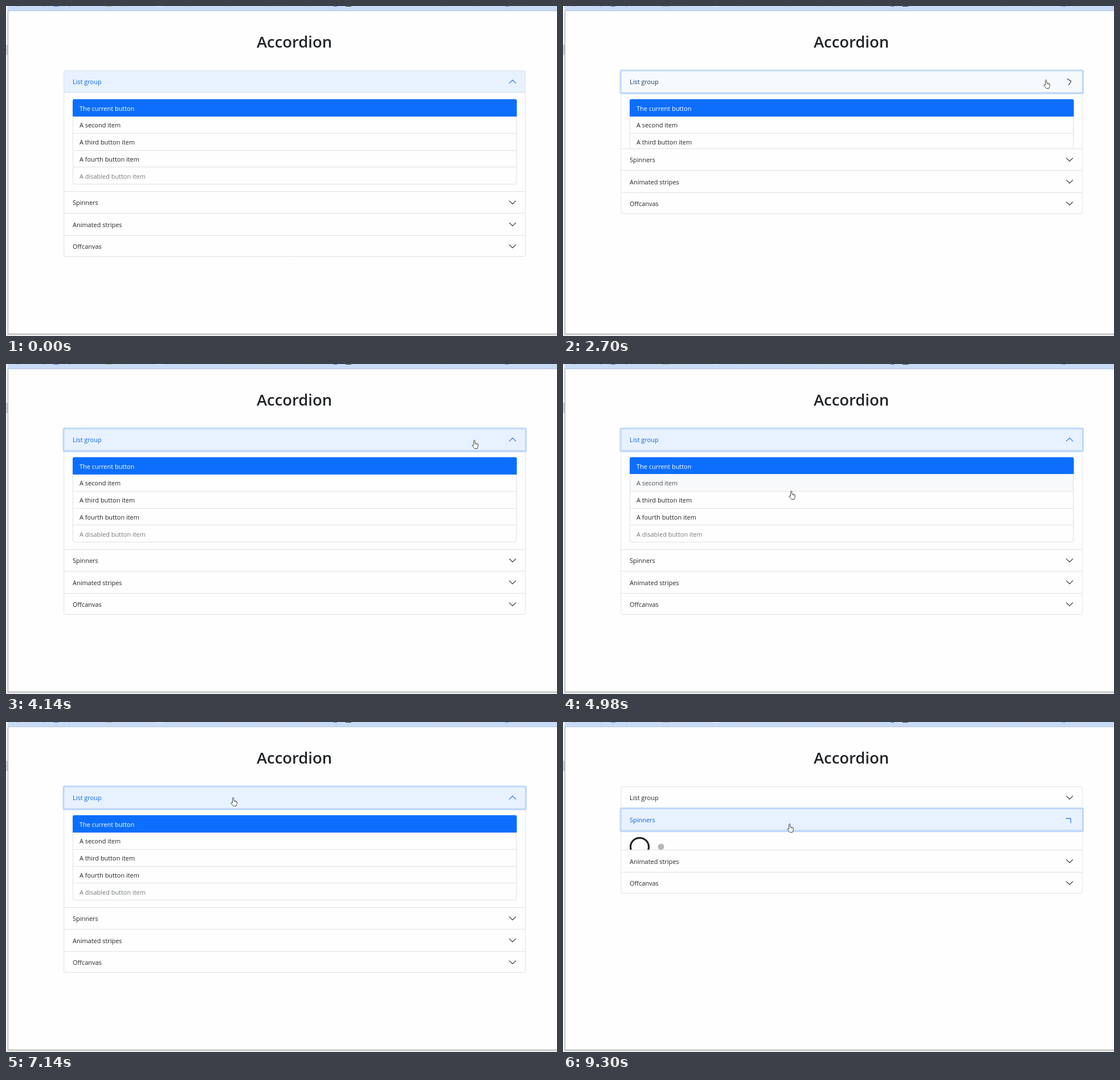
An HTML page with a canvas for the animation above (9.36 s loop, 967 px wide and 579 px high).

```html
<!DOCTYPE html>
<html lang="en">
<head>
<meta charset="utf-8">
<title>Accordion</title>
<style>
html, body { margin: 0; width: 100%; height: 100%; overflow: hidden; background: #fff; }
canvas { display: block; }
</style>
</head>
<body>
<canvas id="stage" width="967" height="579"></canvas>
<script>
const ctx = document.getElementById('stage').getContext('2d');
const LOOP = 9360, STEP = 60;
const LEFT = 101.5, RIGHT = 911.5, TOP = 113, HEAD = 38.5;
const ROW = 29.75, LIST_TOP = 12.5;
const COLLAPSE = 230, TURN = 131, FADE = 100;
const FONT = '"Open Sans", "Noto Sans", sans-serif';
const DARK = [33, 37, 41], BLUE = [12, 99, 228], WHITE = [254, 254, 254], PALE = [231, 241, 255];
const LINE = '#e1e1e1';

const ITEMS = ['The current button', 'A second item', 'A third button item',
  'A fourth button item', 'A disabled button item'];

// Toggles: [time, open]
const PANELS = [
  { title: 'List group', height: 173.5, toggles: [[-1e4, 1], [2640, 0], [3878, 1], [7938, 0]], body: drawList },
  { title: 'Spinners', height: 53, toggles: [[-1e4, 0], [9213, 1]], body: drawSpinners },
  { title: 'Animated stripes', height: 0, toggles: [[-1e4, 0]] },
  { title: 'Offcanvas', height: 0, toggles: [[-1e4, 0]] }
];

// Pointer path: [time, x, y]
const PATH = [
  [540, 952, 44], [750, 945, 54], [900, 925, 70], [1080, 895, 81], [1200, 862, 87],
  [1440, 817, 96], [1500, 814, 100], [1620, 820, 112], [1800, 838, 126], [1920, 843, 129],
  [4080, 843, 129], [4320, 740, 145], [4560, 530, 178], [4800, 403, 205],
  [4980, 396, 222], [5400, 388, 258], [5760, 384, 286], [5820, 383, 289], [5940, 384, 300],
  [6120, 384, 300], [6300, 378, 275], [6540, 380, 236], [6840, 386, 170], [7080, 394, 133],
  [7140, 394, 132], [8340, 394, 132], [8580, 387, 185], [8760, 393, 178]
];

const HAND = new Path2D('M3.5 10V1.7a1.1 1.1 0 0 1 2.2 0V6.1l4.5 1q1.4.4 1.3 1.9L10.8 12.4 9.8 15.5H5L1 10.7q-.6-1.3.8-1.5z');
const KNUCKLES = new Path2D('M7.5 6.8v1.8M9.4 7.2v1.6');
const ARROW = new Path2D('M.5.5V13l2.9-2.7 2 4.8 2-.9-2-4.6h4z');

const clamp = v => Math.max(0, Math.min(1, v));
const lerp = (a, b, k) => a + (b - a) * k;
const mix = (a, b, k) => `rgb(${a.map((v, i) => Math.round(lerp(v, b[i], k)))})`;

function bezier(x1, y1, x2, y2) {
  const at = (a, b, s) => 3 * a * s * (1 - s) ** 2 + 3 * b * s * s * (1 - s) + s ** 3;
  return x => {
    let lo = 0, hi = 1;
    for (let i = 0; i < 24; i++) {
      const mid = (lo + hi) / 2;
      if (at(x1, x2, mid) < x) lo = mid; else hi = mid;
    }
    return at(y1, y2, lo);
  };
}
const ease = bezier(.25, .1, .25, 1);
const easeInOut = bezier(.42, 0, .58, 1);

const lastToggle = (panel, t) => panel.toggles.filter(e => e[0] <= t).pop();
const isOpen = (panel, t) => lastToggle(panel, t)[1];

function amount(panel, t, span, curve) {
  const [start, open] = lastToggle(panel, t);
  const k = curve(clamp((t - start) / span));
  return open ? k : 1 - k;
}

function pointer(t) {
  if (t < PATH[0][0]) return null;
  const i = PATH.findIndex(p => p[0] > t);
  if (i < 0) return PATH[PATH.length - 1].slice(1);
  const a = PATH[i - 1], b = PATH[i], k = (t - a[0]) / (b[0] - a[0]);
  return [lerp(a[1], b[1], k), lerp(a[2], b[2], k)];
}

function fill(color, x, y, w, h) {
  ctx.fillStyle = color;
  ctx.fillRect(x, y, w, h);
}

function roundBox(x, y, w, h, r) {
  ctx.beginPath();
  ctx.roundRect(x, y, w, h, r);
}

function text(str, x, y, color, font = '10.95px ') {
  ctx.font = font + FONT;
  ctx.fillStyle = color;
  ctx.fillText(str, x, y);
}

function drawWindow() {
  fill('#fefefe', 0, 0, 967, 579);
  fill('#f3f3f3', 0, 0, 3, 579);
  fill('#cdcdcd', 0, 68, 3, 18);
  fill('#c8dbf6', 3, 0, 964, 8);
  fill('#b7c6da', 3, 8, 964, 1);
  fill('#e9e9e9', 0, 576, 967, 3);
  fill('#a0a0a0', 3, 9, 1, 567);
  fill('#939393', 3, 575, 964, 1);
  // Lower edges of the bookmark icons
  for (const x of [204, 315, 390, 455, 480, 530, 770, 828, 903]) fill('#d5d5d0', x - 5, 0, 11, 1);
  fill('#e0a890', 18, 0, 4, 1);
  fill('#8fb4ee', 64, 0, 3, 1);
  fill('#3b7cf0', 84, 0, 8, 1);
  fill('#8fb4ee', 110, 0, 3, 1);
  fill('#b9ad9c', 175, 0, 11, 1);
  fill('#eef3ee', 263, 0, 11, 1);
  fill('#2f68e0', 575, 0, 6, 1);
  fill('#30363c', 596, 0, 10, 1);
  fill('#5b8ff0', 876, 0, 6, 1);
}

function drawList(y, t, tip) {
  const x = 117, w = 779.5, top = y + LIST_TOP;
  const hover = tip && tip[0] > x && tip[0] < x + w ? Math.floor((tip[1] - top) / ROW) : -1;
  ITEMS.forEach((label, i) => {
    const rowTop = Math.round(top + i * ROW - .6);
    const lit = i === hover && i > 0 && i < 4;
    if (lit) fill('#f8f9fa', x, rowTop, w, ROW);
    if (i > 1) fill(LINE, x, rowTop, w, 1);
    const color = i === 0 ? '#fff' : i === 4 ? '#757b80' : lit ? '#495057' : '#212529';
    if (i === 0) {
      ctx.fillStyle = '#0d6efd';
      roundBox(x, top - .5, w, ROW + .7, [3, 3, 0, 0]);
      ctx.fill();
    }
    text(label, 129, top + i * ROW + 19.5, color);
  });
  ctx.strokeStyle = LINE;
  ctx.lineWidth = 1;
  ctx.beginPath();
  ctx.moveTo(x + .5, top + ROW + .5);
  ctx.lineTo(x + .5, top + 146);
  ctx.quadraticCurveTo(x + .5, top + 148.5, x + 3, top + 148.5);
  ctx.lineTo(x + w - 4, top + 148.5);
  ctx.quadraticCurveTo(x + w - 1, top + 148.5, x + w - 1, top + 146);
  ctx.lineTo(x + w - 1, top + ROW + .5);
  ctx.stroke();
}

function drawSpinners(y, t) {
  const cy = y + 29.3, since = t - 9213;
  const turn = Math.PI * (.5 + 2 * (since - 87) / 490);
  ctx.strokeStyle = '#212529';
  ctx.lineWidth = 3.2;
  ctx.beginPath();
  ctx.arc(134.5, cy, 16, turn + Math.PI / 4, turn + Math.PI * 1.75);
  ctx.stroke();
  const k = clamp(since / 245);
  ctx.fillStyle = `rgba(33,37,41,${k * .92})`;
  ctx.beginPath();
  ctx.arc(172, cy - .3, 15.5 * k, 0, Math.PI * 2);
  ctx.fill();
}

function chevron(y, turn, color) {
  ctx.save();
  ctx.translate(889, y);
  ctx.rotate(-Math.PI * turn);
  ctx.strokeStyle = color;
  ctx.lineWidth = 1.05;
  ctx.lineCap = ctx.lineJoin = 'round';
  ctx.beginPath();
  ctx.moveTo(-5.6, -2.8);
  ctx.lineTo(0, 2.8);
  ctx.lineTo(5.6, -2.8);
  ctx.stroke();
  ctx.restore();
}

function drawRing(y, alpha) {
  if (alpha <= 0) return;
  ctx.globalAlpha = alpha;
  ctx.strokeStyle = '#bfd8fc';
  ctx.lineWidth = 3;
  roundBox(101, y, 811.5, 40.3, 2);
  ctx.stroke();
  ctx.globalAlpha = 1;
}

function drawAccordion(t, tip) {
  const width = RIGHT - LEFT;
  const tops = [];
  let y = TOP;
  for (const panel of PANELS) {
    tops.push(y);
    const shown = panel.height * amount(panel, t, COLLAPSE, ease);
    const tint = amount(panel, t, FADE, easeInOut);
    if (tint > 0) fill(mix(WHITE, PALE, tint), LEFT, y, width, HEAD);
    if (y > TOP) fill(LINE, LEFT, Math.round(y), width, 1);
    if (shown > .2) {
      fill(mix([223, 223, 223], [205, 217, 233], tint), LEFT, Math.round(y + HEAD) - 1, width, 1);
      ctx.save();
      ctx.beginPath();
      ctx.rect(LEFT, y + HEAD, width, shown);
      ctx.clip();
      panel.body(y + HEAD, t, tip);
      ctx.restore();
    }
    text(panel.title, 117, y + 24.3, mix(DARK, BLUE, tint));
    chevron(y + 19.6, amount(panel, t, TURN, easeInOut), mix(DARK, BLUE, isOpen(panel, t)));
    y += HEAD + shown;
  }
  ctx.strokeStyle = LINE;
  ctx.lineWidth = 1;
  roundBox(LEFT + .2, TOP + .5, width - .4, Math.round(y) - TOP - 1, 3);
  ctx.stroke();
  const moved = clamp((t - 8940) / FADE);
  drawRing(tops[0], clamp((t - 2560) / FADE) * (1 - moved));
  drawRing(tops[1], moved);
  return tops;
}

function drawPointer(tip, tops, t) {
  const [x, y] = tip;
  const listTop = TOP + HEAD + LIST_TOP;
  const onHead = x > LEFT && x < RIGHT && tops.some(top => y >= top && y < top + HEAD);
  const onItem = isOpen(PANELS[0], t) && x > 117 && x < 896 && y >= listTop && y < listTop + 4 * ROW;
  const hand = onHead || onItem;
  const shape = hand ? HAND : ARROW;
  ctx.save();
  ctx.translate(x, y);
  ctx.lineWidth = .9;
  ctx.lineJoin = 'round';
  ctx.fillStyle = '#fff';
  ctx.strokeStyle = '#333';
  ctx.fill(shape);
  ctx.stroke(shape);
  if (hand) {
    ctx.lineWidth = .7;
    ctx.stroke(KNUCKLES);
  }
  ctx.restore();
}

function draw(t) {
  const tip = pointer(t);
  drawWindow();
  ctx.textAlign = 'center';
  text('Accordion', 506, 73, '#212529', '600 27.4px ');
  ctx.textAlign = 'left';
  const tops = drawAccordion(t, tip);
  if (tip) drawPointer(tip, tops, t);
}

const begin = performance.now();
function tick() {
  const t = (performance.now() - begin) % LOOP;
  draw(Math.floor(t / STEP) * STEP);
  requestAnimationFrame(tick);
}
tick();
</script>
</body>
</html>
```
